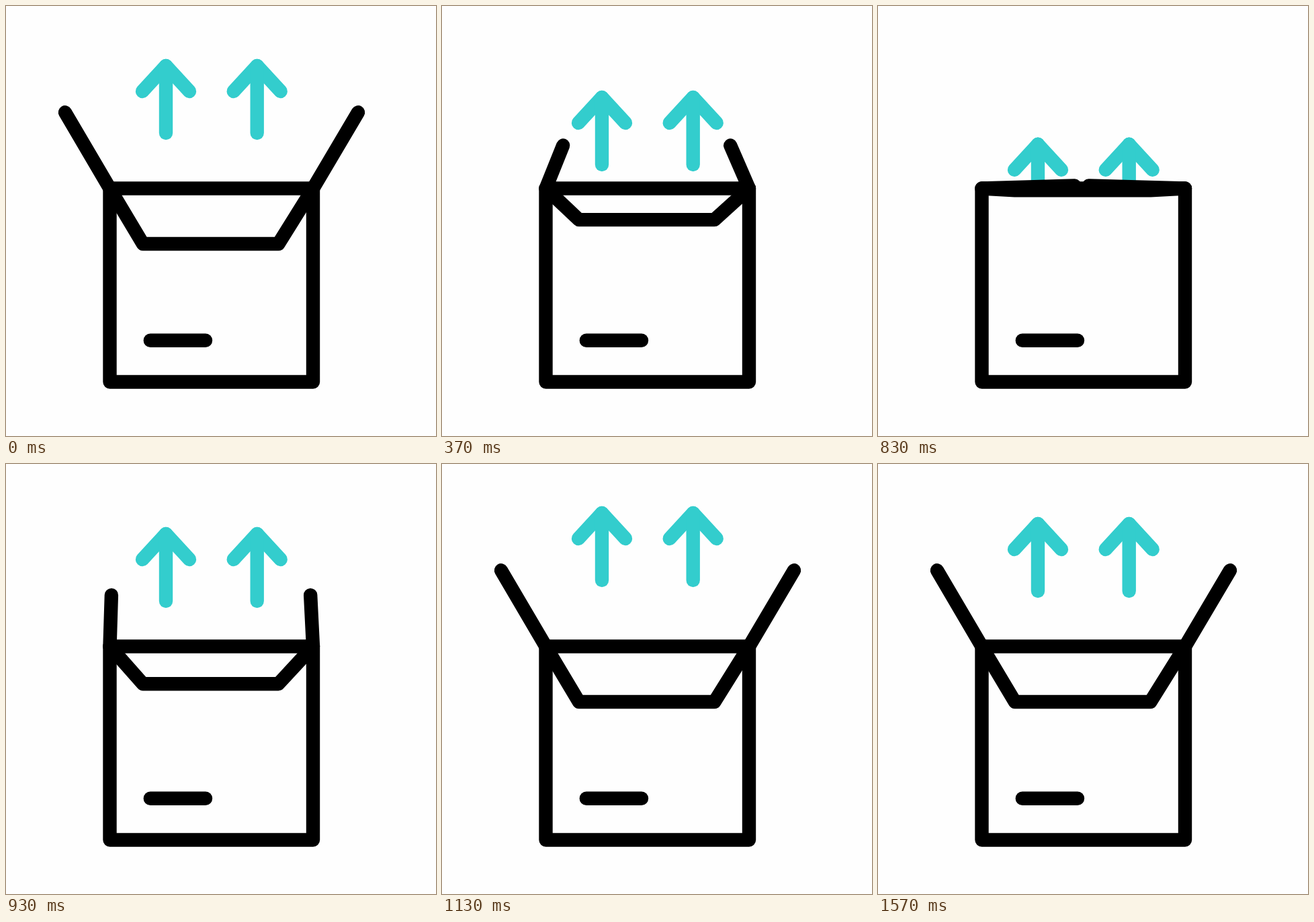
Animation, 640 px wide and 640 px high, one loop 2.03 s. Source, as an HTML page with a canvas:

```html
<!DOCTYPE html>
<html lang="en">
<head>
<meta charset="utf-8">
<title>Box</title>
<style>
  html, body { margin: 0; width: 100%; height: 100%; overflow: hidden; background: #fefefe; }
  canvas { display: block; width: 640px; height: 640px; }
</style>
</head>
<body>
<canvas id="stage" width="640" height="640"></canvas>
<script>
const ctx = document.getElementById('stage').getContext('2d');
const LOOP = 2030, STEP = 100 / 3;
const INK = '#000', TEAL = '#33cdcd', PAPER = '#fefefe';
const LEFT = 154.5, RIGHT = 457, TOP = 271.5, BOTTOM = 559.5;

const clamp = u => Math.min(1, Math.max(0, u));
const mix = (a, b, u) => a + (b - a) * u;
const span = (n, from, to) => clamp((n - from) / (to - from));
const smooth = u => u * u * (3 - 2 * u);
const easeOut = u => 1 - (1 - u) * (1 - u);

// Symmetric cubic Bezier ease with handles of length 0.49.
function ease(x) {
  const a = 0.49;
  let lo = 0, hi = 1;
  for (let i = 0; i < 24; i++) {
    const t = (lo + hi) / 2, r = 1 - t;
    if (3 * a * t * r * r + 3 * (1 - a) * t * t * r + t * t * t < x) lo = t;
    else hi = t;
  }
  return smooth(lo);
}

// 1 = flaps wide open, 0 = shut
const openness = n => n < 24 ? 1 - ease(span(n, 4, 19)) : ease(span(n, 24, 30.75));

// Height of the arrow tips: hop and dive, then rise, overshoot and settle.
function tipY(n) {
  if (n < 6) return mix(89, 41, smooth(span(n, 1, 6)));
  if (n < 20) return 41 + 3.8 * (n - 6) ** 2;
  if (n < 28) return mix(285, 104, easeOut(span(n, 24, 28)));
  if (n < 34) return mix(104, 73, span(n, 28, 34));
  if (n < 41) return mix(73, 39, span(n, 34, 41));
  return mix(39, 89, smooth(span(n, 41, 47)));
}

function line(color, ...points) {
  ctx.strokeStyle = color;
  ctx.beginPath();
  points.forEach(([x, y]) => ctx.lineTo(x, y));
  ctx.stroke();
}

function arrow(x, y) {
  line(TEAL, [x - 35, y + 38], [x, y], [x + 35, y + 38]);
  line(TEAL, [x, y], [x, y + 100]);
}

function draw(n) {
  const open = openness(n), y = tipY(n);
  ctx.fillStyle = PAPER;
  ctx.fillRect(0, 0, 640, 640);
  ctx.lineWidth = 20.4;
  ctx.lineCap = ctx.lineJoin = 'round';

  ctx.save();
  ctx.beginPath();
  ctx.rect(0, 0, 640, TOP);
  ctx.clip();
  arrow(238, y);
  arrow(373.7, y);
  ctx.restore();

  ctx.strokeStyle = INK;
  ctx.strokeRect(LEFT, TOP, RIGHT - LEFT, BOTTOM - TOP);
  line(INK, [214.8, 497.7], [297, 497.7]);

  const frontY = mix(TOP, 354, open), flapY = mix(TOP, 158.3, open);
  line(INK, [LEFT, TOP], [203.8, frontY], [405.5, frontY], [RIGHT, TOP]);
  line(INK, [LEFT, TOP], [mix(300, 88, open), flapY]);
  line(INK, [RIGHT, TOP], [mix(306, 524, open), flapY]);
}

function tick() {
  const time = performance.now() % LOOP;
  draw(Math.floor((time + 3.5) / STEP));
  requestAnimationFrame(tick);
}
tick();
</script>
</body>
</html>
```
